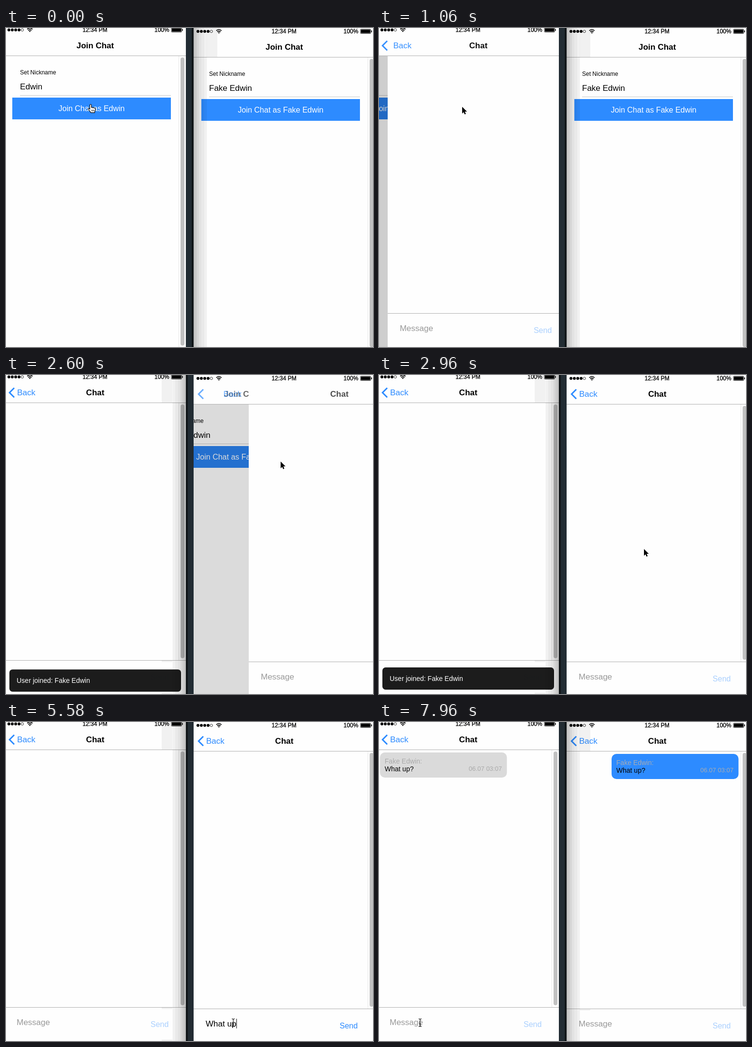
These frames come from a looping animation (759x660 px, 8 s). An HTML page:

```html
<!DOCTYPE html>
<html lang="en">
<head>
<meta charset="utf-8">
<title>Chat between two phones</title>
<style>
  html, body { margin: 0; width: 100%; height: 100%; overflow: hidden; background: #222c33; }
  #stage { display: block; width: 100%; height: 100%; }
  text { font-family: "Liberation Sans", Arial, sans-serif; white-space: pre; }
  .status text { stroke: #000; stroke-width: .3; }
  .title { font-weight: bold; text-anchor: middle; }
  .page { fill: #fefefe; }
  .rule { fill: #b0b0b0; }
  .accent { fill: #2d8bff; }
  .muted { fill: #999; }
  .note { fill: #aaa; }
</style>
</head>
<body>
<svg id="stage" viewBox="0 0 759 660"></svg>
<script>
const STEP = 118.9, START = 230, LOOP = 8000;
const GUEST = 'Fake Edwin';
const stage = document.getElementById('stage');

const rect = (x, y, w, h, attrs = '') =>
  `<rect x="${x}" y="${y}" width="${w}" height="${h}" ${attrs}/>`;
const label = (x, y, size, str, attrs = '') =>
  `<text x="${x}" y="${y}" font-size="${size}" ${attrs}>${str}</text>`;
const scrollbar = bottom =>
  rect(360, 61, 1, bottom - 57, 'fill="#e6e6e6"') +
  rect(364, 64, 8, bottom - 64, 'rx="4" fill="#c1c1c1"');

const statusBar = () => `<g class="status">
  ${[9, 16, 23, 30].map(x => `<circle cx="${x}" cy="7" r="3"/>`).join('')}
  <circle cx="36.7" cy="7" r="2.6" fill="none" stroke="#000" stroke-width=".8"/>
  <g fill="none" stroke="#000" stroke-width="1.7">
    <path d="M46.8 5.6Q52.3 .8 57.8 5.6M48.9 8Q52.3 5 55.7 8"/>
  </g>
  <path d="M50.4 9.6Q52.3 8 54.2 9.6L52.3 11.6z"/>
  ${label(187, 11, 12, '12:34 PM', 'text-anchor="middle"')}
  ${label(310, 11, 12, '100%')}
  ${rect(344.9, 2.5, 21.5, 9, 'rx="1.5" fill="none" stroke="#000" stroke-width=".8"')}
  ${rect(346, 3.5, 19.3, 7)}
  ${rect(367.2, 5, 1.5, 4, 'rx=".7"')}
</g>`;

const bubble = (x, fill, note) => `<g class="bubble">
  ${rect(x, 66, 262.5, 52, `rx="10" fill="${fill}"`)}
  ${label(x + 9.8, 89, 14, GUEST + ':', `fill="${note}"`)}
  ${label(x + 9.8, 105, 14, 'What up?')}
  ${label(x + 183.5, 104, 13, '06.07 03:07', `fill="${note}"`)}
</g>`;

const phone = (id, x, y, nick, message) => `
<svg id="${id}" x="${x}" y="${y}" width="375" height="667">
  ${rect(0, 0, 375, 667)}
  <g class="leave">
    ${rect(0, 60, 375, 607, 'class="page"')}
    ${label(32, 99, 12, 'Set Nickname')}
    ${label(32, 130, 17, nick)}
    ${rect(32, 142, 312, 1, 'fill="#c8c8c8"')}
    ${rect(16, 147, 328, 45, 'class="button"')}
    ${label(180, 175, 16, 'Join Chat as ' + nick, 'fill="#fff" text-anchor="middle"')}
    ${scrollbar(660)}
  </g>
  ${rect(0, 0, 375, 60, 'class="page"')}
  <g class="oldTitle">${label(187.5, 45, 17, 'Join Chat', 'class="title"')}</g>
  <g class="enter">
    ${rect(0, 0, 375, 667, 'class="page"')}
    <g class="newTitle">${label(187.5, 45, 17, 'Chat', 'class="title"')}</g>
    ${rect(0, 593, 375, 1, 'class="rule"')}
    ${label(25, 630, 17, 'Message', 'class="input muted"')}
    ${rect(25, 614, 1, 20, 'class="caret"')}
    ${label(302, 634, 16, 'Send', 'class="send accent"')}
    ${message}
    <g class="bar">${scrollbar(589)}</g>
  </g>
  <g class="back">
    <path d="M20 29.8L10.3 39.5L20 49.2" fill="none" stroke="#2d8bff" stroke-width="3"/>
    <g class="backText">${label(26, 45, 17, 'Back', 'class="accent"')}</g>
  </g>
  ${rect(0, 60, 375, 1, 'class="rule"')}
  ${statusBar()}
</svg>`;

// Window shadow built from nested strips, growing in direction dir from edge.
const shadow = (id, edge, dir, extra) => {
  const strip = (w, alpha) => rect(dir > 0 ? edge : edge - w, 0, w, 660, `opacity="${alpha}"`);
  const outer = dir > 0 ? edge + 27 : edge - 50;
  return `<g id="${id}">
    ${strip(27.5, .05)}${strip(22, .03)}${strip(16, .03)}${strip(11, .05)}${strip(7, .05)}${strip(3, .06)}
    ${rect(dir > 0 ? edge - 4 : edge, 0, 4, 660, 'opacity=".5"')}
    ${extra.map(([y, h]) => rect(outer, y, 22, h, 'opacity=".05"')).join('')}
  </g>`;
};

const shapes = {
  arrow: `<path d="M0 0V14l3.2-3 2 4.8 2.4-1-2-4.7h4.4z" stroke="#fff" stroke-width="1.6" paint-order="stroke"/>`,
  hand: `<path d="M-1.6 9V1.6a1.6 1.6 0 0 1 3.2 0V7c.4-1.4 2.8-1.4 3 .2c.6-1.2 2.7-.9 2.8.7c.9-.9 2.5-.3 2.5 1.2c0 3.5-1.2 4.5-1.6 8H.3C-1 13.5-5.5 11-5.2 9.3c.2-1.6 2.2-1.4 3.6.7z"
    fill="#fff" stroke="#000" stroke-width="1.1"/><path d="M2.3 11v3.4m2.3-3.4v3.4m2.2-3.4v3.4" stroke="#000" stroke-width=".9"/>`,
  beam: `<path d="M-3-8Q0-8 0-6V6Q0 8-3 8M3-8Q0-8 0-6M0 6Q0 8 3 8M-2 3H2" fill="none" stroke="#000" stroke-width="1.1"/>`
};

stage.innerHTML =
  phone('left', -3, -3, 'Edwin', bubble(5, '#dadada', '#aaa')) +
  phone('right', 388, 0, GUEST, bubble(93, '#2d8bff', '#a6abb3')) +
  `<g id="toast">${rect(7, 605, 355, 46, 'rx="6.5" fill="#181818" opacity=".98"')}
    ${label(22, 633, 14, 'User joined: ' + GUEST, 'fill="#fff"')}</g>` +
  shadow('onRight', 388, 1, [[0, 60], [594, 3]]) +
  shadow('onLeft', 372, -1, [[0, 57], [590, 4], [657, 3]]) +
  '<g id="pointer"></g>';

const $ = selector => stage.querySelector(selector);
const show = (el, on) => el.setAttribute('visibility', on ? 'visible' : 'hidden');
const shift = (el, x, y = 0) => el.setAttribute('transform', `translate(${x} ${y})`);
const fade = (el, alpha) => el.setAttribute('opacity', alpha);

// cubic-bezier(.36, .66, .04, 1)
function ease(p) {
  if (p <= 0) return 0;
  if (p >= 1) return 1;
  const curve = (a, b, s) => 3 * a * s * (1 - s) ** 2 + 3 * b * s * s * (1 - s) + s ** 3;
  let lo = 0, hi = 1;
  for (let i = 0; i < 24; i++) {
    const mid = (lo + hi) / 2;
    if (curve(.36, .04, mid) < p) lo = mid; else hi = mid;
  }
  return curve(.66, 1, lo);
}

// Pointer stops: step, x, y, shape
const stops = [
  [-2, 175, 158, 'hand'], [1, 174, 159, 'hand'], [4, 172, 162, 'hand'], [6, 172, 163, 'arrow'],
  [7, 172, 163, 'arrow'], [8, 290, 205, 'arrow'], [9, 510, 265, 'arrow'], [10, 599, 279, 'arrow'],
  [13, 599, 279, 'arrow'], [14, 592, 265, 'arrow'], [15, 580, 225, 'arrow'], [16, 570, 190, 'hand'],
  [17, 568, 180, 'hand'], [20, 568, 179, 'arrow'], [21, 566, 200, 'arrow'], [23, 548, 360, 'arrow'],
  [25, 528, 510, 'arrow'], [26, 502, 575, 'arrow'], [27, 480, 632, 'beam'], [29, 470, 622, 'beam'],
  [49, 470, 622, 'beam'], [50, 480, 630, 'beam'], [51, 540, 640, 'arrow'], [52, 625, 641, 'arrow'],
  [53, 685, 632, 'hand'], [54, 706, 625, 'hand'], [56, 706, 625, 'arrow'], [58, 706, 625, 'arrow'],
  [59, 690, 626, 'arrow'], [61, 420, 628, 'arrow'], [63, 130, 624, 'beam'], [64, 85, 622, 'beam']
];
const typing = [[32, 'W'], [36, 'Wha'], [37, 'What'], [42, 'What '], [43, 'What u'], [45, 'What up'], [47, 'What up?'], [56, '']];
const sendAlpha = [[32, .6], [33, .8], [34, 1], [56, .7], [57, .4]];
const latest = (list, step, initial) =>
  list.reduce((value, [at, next]) => step >= at ? next : value, initial);

function slide(id, p) {
  const part = name => $(`#${id} .${name}`);
  const moved = -.33 * 375 * p;
  shift(part('leave'), moved);
  fade(part('leave'), 1 - .2 * p);
  shift(part('oldTitle'), moved);
  fade(part('oldTitle'), 1 - .6 * p);
  shift(part('enter'), 375 * (1 - p));
  fade(part('newTitle'), p);
  fade(part('back'), p);
  shift(part('backText'), 117 * (1 - p));
  show(part('bar'), p > .999);
}

function movePointer(step) {
  const i = stops.findLastIndex(stop => stop[0] <= step);
  const [at, x, y, shape] = stops[i];
  const [to, nx, ny] = stops[i + 1] || [at + 1, x, y];
  const p = Math.min(1, (step - at) / (to - at));
  const pointer = $('#pointer');
  pointer.innerHTML = shapes[shape];
  shift(pointer, x + (nx - x) * p, y + (ny - y) * p);
}

function render(step) {
  const time = START + step * STEP;
  slide('left', ease((time - 807) / 500));
  slide('right', ease((time - 2482) / 500));
  $('#left .button').setAttribute('fill', step >= 3 ? '#2a82f0' : '#2d8bff');
  $('#right .button').setAttribute('fill', step >= 19 ? '#2a82f0' : '#2d8bff');

  const raised = ease((time - 2423) / 400) - ease((time - 4400) / 300);
  shift($('#toast'), 0, 56 * (1 - raised));

  const typed = latest(typing, step, '');
  const input = $('#right .input');
  input.textContent = typed || 'Message';
  input.setAttribute('class', typed ? 'input' : 'input muted');
  const caret = $('#right .caret');
  caret.setAttribute('x', 25 + (typed ? input.getComputedTextLength() : 0));
  show(caret, step >= 30 && step < 56);
  show($('#left .caret'), false);
  fade($('#left .send'), .4);
  fade($('#right .send'), latest(sendAlpha, step, .4));
  stage.querySelectorAll('.bubble').forEach(el => show(el, step >= 56));

  const rightFocused = step >= 12 && step < 65;
  show($('#onLeft'), rightFocused);
  show($('#onRight'), !rightFocused);
  show($('#onRight').lastElementChild, !rightFocused && step >= 65);
  movePointer(step);
}

let shown;
function frame() {
  const time = performance.now() % LOOP;
  const step = Math.max(-2, Math.floor((time - START + 10) / STEP));
  if (step !== shown) render(shown = step);
  requestAnimationFrame(frame);
}
frame();
</script>
</body>
</html>
```
